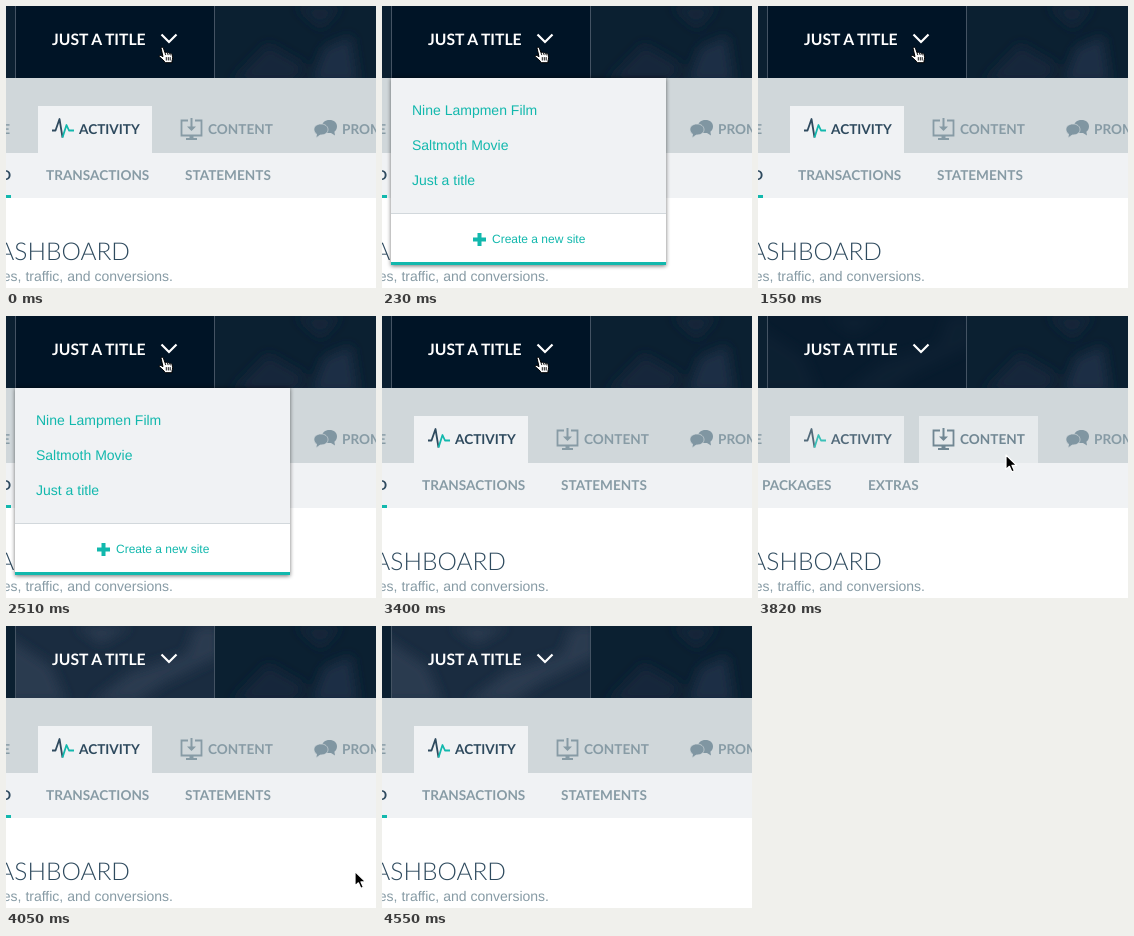
Recreate the animation shown at these times as an HTML page. Size 370 px wide and 282 px high, loop 4830 ms.

```html
<!DOCTYPE html>
<html lang="en">
<head>
<meta charset="utf-8">
<title>Dashboard menu</title>
<style>
  html, body { margin: 0; width: 100%; height: 100%; overflow: hidden; background: #fff; }
  svg { display: block; width: 370px; height: 282px; }
  text { white-space: pre; text-rendering: geometricPrecision; }
  .caps { font: 700 13.6px Lato, sans-serif; }
  .body { font: 14px "Liberation Sans", Arial, sans-serif; }
  .muted { fill: #879ba5; }
  .teal { fill: #12b8ad; }
</style>
</head>
<body>
<svg viewBox="0 0 370 282">
  <defs>
    <filter id="soft" x="-50%" y="-50%" width="200%" height="200%"><feGaussianBlur stdDeviation="6"/></filter>
    <filter id="shade" x="-10%" y="-10%" width="120%" height="120%"><feGaussianBlur stdDeviation="2"/></filter>
    <clipPath id="top"><rect width="370" height="72"/></clipPath>
    <clipPath id="panel"><rect x="10" width="198" height="72"/></clipPath>
  </defs>

  <rect width="370" height="282" fill="#fff"/>

  <g clip-path="url(#top)">
    <rect width="370" height="72" fill="#0b2031"/>
    <g filter="url(#soft)">
      <path d="M318 42L345 30 352 76H305Z" fill="#1d2e45"/>
      <path d="M225 76L262 38 300 60 290 76Z" fill="#14273a"/>
      <path d="M290 0H335L315 22Z" fill="#14273b"/>
    </g>
    <g clip-path="url(#panel)">
      <rect x="10" width="198" height="72" fill="#1a2c40"/>
      <g filter="url(#soft)" fill="#293b4f">
        <path d="M0 10L45 40 60 76H0Z"/>
        <path d="M85 76L125 46 180 28 190 0H214V30L160 56 130 76Z"/>
        <path d="M70 0H125L95 18Z"/>
      </g>
    </g>
    <rect id="hover" x="10" width="198" height="72" fill="#001426"/>
    <path d="M9.5 0V72M208.5 0V72" stroke="#445363"/>
  </g>
  <text x="46" y="39" fill="#fff" style="font:700 15.7px Lato,sans-serif">JUST A TITLE</text>
  <path d="M155.5 28.5L163 36 170.5 28.5" fill="none" stroke="#fff" stroke-width="2.2"/>

  <rect y="72" width="370" height="75" fill="#d0d7da"/>
  <rect id="actBg" x="32" y="100" width="114" height="47" fill="#f0f2f4"/>
  <rect id="conBg" x="161" y="100" width="119" height="47" fill="#f0f2f4"/>
  <text class="caps muted" x="4" y="128" text-anchor="end">HOME</text>

  <g fill="none" stroke-width="1.8" stroke-linejoin="round">
    <path id="pulse" d="M46 124.5H49.5L53.5 113 56.5 131.5"/>
    <path id="beat" d="M56.5 131.5L60.5 119 63 124.5H68"/>
  </g>
  <text id="actText" class="caps" x="73" y="128">ACTIVITY</text>

  <g id="con">
    <path d="M182 114.5H175.5V129.5H195.5V114.5H189" fill="none" stroke="currentColor" stroke-width="1.8"/>
    <path d="M184.5 112H186.5V120.5H190L185.5 125 181 120.5H184.5ZM183.5 130H187.5V132H191V134H180V132H183.5Z" fill="currentColor"/>
    <text class="caps" x="202" y="128" fill="currentColor">CONTENT</text>
  </g>

  <g fill="#8096a2">
    <path d="M323.5 114C328 114 331 116.6 331 120.2 331 122.6 330 124.6 328.4 125.8L329 129.5 325 127C319 127.5 316 124 316 120.2 316 116.6 319 114 323.5 114Z"/>
    <path d="M315 118C310.8 118 308 120.4 308 123.4 308 125.4 309 127 310.6 128L310 132 314.2 129C319.2 129.2 322 126.8 322 123.6 322 120.4 319.2 118 315 118Z" stroke="#d0d7da" stroke-width=".7"/>
  </g>
  <text class="caps muted" x="336" y="128">PROMOTE</text>

  <rect y="147" width="370" height="45" fill="#f0f2f4"/>
  <g id="actNav">
    <text class="caps" x="5" y="174" text-anchor="end" fill="#2e4a5e">DASHBOARD</text>
    <rect y="189" width="5" height="3" class="teal"/>
    <text class="caps muted" x="40" y="174">TRANSACTIONS</text>
    <text class="caps muted" x="179" y="174">STATEMENTS</text>
  </g>
  <g id="conNav" class="caps muted">
    <text x="4" y="174">PACKAGES</text>
    <text x="110" y="174">EXTRAS</text>
  </g>

  <text x="124" y="254" text-anchor="end" fill="#2e4a5e" style="font:300 24.5px Lato,sans-serif">DASHBOARD</text>
  <text class="body muted" x="167" y="275" text-anchor="end">sales, traffic, and conversions.</text>

  <g id="menu">
    <rect x="9" y="72" width="275" height="188" fill="#000" opacity=".55" filter="url(#shade)"/>
    <rect x="9" y="72" width="275" height="135" fill="#f0f2f4"/>
    <rect x="9" y="207" width="275" height="1" fill="#d2d8dc"/>
    <rect x="9" y="208" width="275" height="48" fill="#fff"/>
    <rect x="9" y="256" width="275" height="3" class="teal"/>
    <g class="body teal">
      <text x="30" y="109">Nine Lampmen Film</text>
      <text x="30" y="144">Saltmoth Movie</text>
      <text x="30" y="179">Just a title</text>
      <path d="M95.5 227H99.5V231.5H104V235.5H99.5V240H95.5V235.5H91V231.5H95.5Z"/>
      <text x="110" y="237" style="font-size:12px">Create a new site</text>
    </g>
  </g>

  <g id="hand" stroke="#000" stroke-linejoin="round">
    <path d="M3.2 2.2C2.6.6 4.8.1 5.4 1.6L7 6.2C8 5.3 9.2 5.8 9.5 6.6 10.4 5.8 11.5 6.3 11.8 7.1 12.8 6.5 13.7 7 14 7.9 14.7 10.3 14.8 12.1 14 14.3V16.2H7.2C6 14 4 12.4 1.6 10.6.4 9.4 1.6 8.2 3 9L5 10.2Z" fill="#fff"/>
    <path d="M7 6.2L7.8 8.6M9.5 6.6L10.2 8.6M11.8 7.1L12.4 8.8M8.3 10.6V14M10.3 10.6V14M12.2 10.6V14" fill="none" stroke-width=".9"/>
  </g>
  <path id="arrow" d="M0 0V14.5L3.4 11.3 5.8 16.8 8.4 15.7 6 10.4H10.6Z" fill="#000" stroke="#fff" stroke-width="1.2" stroke-linejoin="round"/>
</svg>
<script>
const LOOP = 4830;
const $ = id => document.getElementById(id);

// start, end of each time the menu is open
const open = [[230, 1550], [2510, 3400]];

// time, pointer, x, y
const pointer = [
  [0, 'hand', 152, 40.5],
  [3700, 'hand', 169, 54], [3760, 'arrow', 200, 88], [3820, 'arrow', 248, 139],
  [3880, 'arrow', 300, 193], [3930, 'arrow', 325, 220], [3990, 'arrow', 341, 237],
  [4050, 'arrow', 349, 245.5],
  [4220, 'arrow', 349, 248], [4270, 'arrow', 349.5, 253], [4330, 'arrow', 349.5, 259],
  [4380, 'arrow', 349.5, 265], [4440, 'arrow', 349.5, 271], [4500, 'arrow', 349.5, 278],
  [4550, 'none', 0, 0]
];

// time, title hover, activity fill, activity ink, content fill, content ink
const fades = [
  [0, 1, 1, 1, 0, 0],
  [3760, .9, 1, 1, 0, 0],
  [3820, .7, .8, .6, .7, .25],
  [3880, .5, .5, .1, 1, .45],
  [3930, .3, .7, .5, .5, .3],
  [3990, .1, .9, .8, .2, .1],
  [4050, 0, 1, 1, 0, 0]
];

const at = (steps, t) => steps.findLast(s => s[0] <= t);
const show = (id, on) => $(id).style.display = on ? '' : 'none';
const mix = (a, b, k) => `rgb(${a.map((v, i) => Math.round(v + (b[i] - v) * k))})`;
const grey = [135, 155, 165], dark = [46, 74, 94];
const paleTeal = [120, 205, 200], teal = [18, 184, 173];

function draw(t) {
  show('menu', open.some(([a, b]) => t >= a && t < b));

  const [, kind, x, y] = at(pointer, t);
  for (const id of ['hand', 'arrow']) {
    show(id, id === kind);
    $(id).setAttribute('transform', `translate(${x} ${y})`);
  }

  const [, hover, actFill, actInk, conFill, conInk] = at(fades, t);
  $('hover').style.opacity = hover;
  $('actBg').style.opacity = actFill;
  $('conBg').style.opacity = conFill;
  $('actText').style.fill = $('pulse').style.stroke = mix(grey, dark, actInk);
  $('beat').style.stroke = mix(paleTeal, teal, actInk);
  $('con').style.color = mix(grey, dark, conInk);

  const onContent = conFill > .6;
  show('actNav', !onContent);
  show('conNav', onContent);
}

const start = performance.now();
function tick() {
  draw((performance.now() - start) % LOOP);
  requestAnimationFrame(tick);
}
tick();
</script>
</body>
</html>
```
